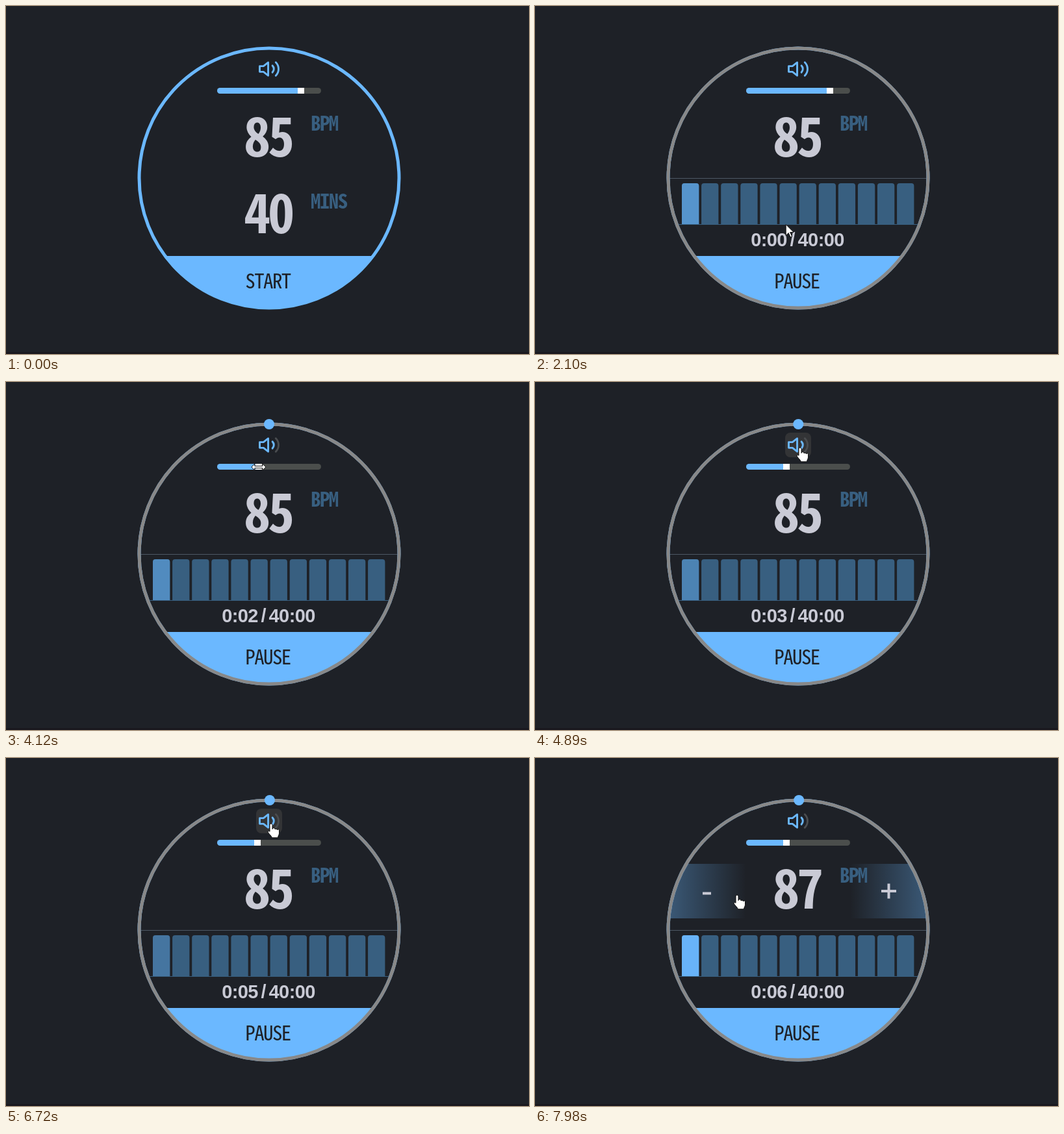
Recreate the animation shown at these times as an HTML page. Size 805 by 536 pixels, loop 8000 ms.

```html
<!DOCTYPE html>
<html lang="en">
<head>
<meta charset="utf-8">
<title>Metronome timer</title>
<style>
  html, body { margin: 0; width: 100%; height: 100%; overflow: hidden; background: #1e2127; }
  svg { display: block; width: 100%; height: 100%; }
  text {
    font-family: "Noto Sans Mono CJK JP", "Liberation Sans Narrow", "Liberation Sans", sans-serif;
    font-weight: 700; letter-spacing: -.05em; fill: #c9cad5;
  }
  .big { font-size: calc(var(--fit) * 88px); text-anchor: middle; }
  .label { font-size: calc(var(--fit) * 33px); fill: #385f80; }
  .action { font-size: calc(var(--fit) * 33px); font-weight: 500; text-anchor: middle; fill: #1e2127; }
  .time {
    font-family: "Liberation Sans Narrow", "Liberation Sans", sans-serif; font-size: 29px;
    letter-spacing: -.02em; word-spacing: -.1em; text-anchor: middle;
  }
  .line { fill: none; stroke: #6bb8ff; stroke-width: 2; stroke-linecap: round; stroke-linejoin: round; }
  .pointer { fill: #fff; stroke: #111; stroke-width: 1; stroke-linejoin: round; }
</style>
</head>
<body>
<svg viewBox="0 0 805 536">
  <defs>
    <clipPath id="face"><circle cx="405" cy="265" r="199"/></clipPath>
    <clipPath id="track"><rect x="325" y="126" width="160" height="9" rx="4.5"/></clipPath>
    <linearGradient id="fade">
      <stop stop-color="#6bb8ff" stop-opacity=".37"/>
      <stop offset="1" stop-color="#6bb8ff" stop-opacity="0"/>
    </linearGradient>
  </defs>
  <rect width="805" height="536" fill="#1e2127"/>
  <rect y="533" width="805" height="3" fill="#1a181e"/>

  <g clip-path="url(#face)">
    <g id="adjust">
      <rect x="206" y="163" width="119" height="84" fill="url(#fade)"/>
      <rect x="206" y="163" width="119" height="84" fill="url(#fade)" transform="matrix(-1 0 0 1 810 0)"/>
      <path d="M258 208.5h13M533 205h23M544.5 193.5v23" stroke="#c9cad5" stroke-width="4"/>
    </g>
    <g id="progress">
      <path d="M206 265.5H604" stroke="#4d5864"/>
      <path d="M206 336.5H604" stroke="#385f80"/>
      <g id="bars" fill="#385f80"></g>
    </g>
    <rect x="200" y="385" width="410" height="90" fill="#6bb8ff"/>
    <rect id="buttonHover" x="200" y="385" width="410" height="90" fill="#84c5ff"/>
  </g>
  <g fill="none" stroke-width="5">
    <circle cx="405" cy="265" r="200" stroke="#6bb8ff"/>
    <circle id="ring" cx="405" cy="265" r="200" stroke="#888"/>
  </g>
  <circle id="dot" cy="65" r="8" fill="#6bb8ff"/>

  <rect id="iconHover" x="385" y="78" width="40" height="38" rx="8" fill="#333436"/>
  <g class="line" transform="translate(387.6 79.6) scale(1.45)">
    <path d="M11 5 6 9H2v6h4l5 4z"/>
    <path d="M15.54 8.46a5 5 0 0 1 0 7.07"/>
    <path id="wave" d="M19.07 4.93a10 10 0 0 1 0 14.14"/>
  </g>
  <g clip-path="url(#track)">
    <rect x="325" y="126" width="160" height="9" fill="#4b4e4c"/>
    <rect id="fill" x="325" y="126" height="9" fill="#6bb8ff"/>
    <rect id="thumb" y="126" width="10" height="9" fill="#fff"/>
  </g>

  <text id="bpm" class="big" x="403" y="201.5" dy=".365em">85</text>
  <text class="label" x="469" y="181" dy=".365em">BPM</text>
  <g id="setup">
    <text class="big" x="403" y="319.5" dy=".365em">40</text>
    <text class="label" x="469" y="301" dy=".365em">MINS</text>
  </g>
  <text id="time" class="time" x="404" y="359.5" dy=".36em"></text>
  <text id="action" class="action" x="403" y="424" dy=".365em"></text>

  <g id="cursor" class="pointer">
    <path id="arrow" d="M0 0V17l4-4 3 6.5 2.5-1-3-6.5H12z"/>
    <path id="hand" d="M-2 2a2 2 0 0 1 4 0v6.5a2 2 0 0 1 4 .3a2 2 0 0 1 3.5 1a1.6 1.6 0 0 1 3 1v4c0 3-2 4-2 7H1.5c-1-3-4-5-6-8c-1-2 1-3 2.5-1.5z"/>
    <path id="resize" d="M-11 0l5-5v3.5H6V-5l5 5-5 5V1.5H-6V5z"/>
  </g>
</svg>
<script>
const LOOP = 8000, ENTER = 720, PRESS = 1400, FIRST_SECOND = 1590;
const $ = id => document.getElementById(id);
const show = (id, on) => $(id).setAttribute('visibility', on ? 'visible' : 'hidden');
const set = (id, attrs) => { for (const k in attrs) $(id).setAttribute(k, attrs[k]); };
const clamp = (v, lo, hi) => Math.min(hi, Math.max(lo, v));
const easeOut = k => 1 - (1 - k) ** 2;

// Size the type by how wide the installed face's digits are.
const bpm = $('bpm');
document.body.style.setProperty('--fit', 1);
const digitWidth = bpm.getComputedTextLength() / 2 / 88;
document.body.style.setProperty('--fit', Math.min(1, Math.sqrt(0.395 / digitWidth)));

// Round only the top corners of each bar.
const bar = (i, attrs = '') =>
  `<path ${attrs} d="M${226 + 30.1 * i} 336v-59q0-4 4-4h18.3q4 0 4 4v59z"/>`;
$('bars').innerHTML = Array.from({ length: 12 }, (_, i) => bar(i)).join('') +
  bar(0, 'id="current" fill="#6bb8ff"');

const below = [396, 545], button = [382, 441], tempo = [392, 190], loud = [451, 131],
  quiet = [387, 131], icon = [408, 101], plus = [534, 205], minus = [311, 211];
const trips = [
  { from: ENTER, to: 950, place: button },
  { from: 1950, to: 2590, place: tempo },
  { from: 2730, to: 3300, place: loud },
  { from: 3440, to: 4260, place: quiet },
  { from: 4540, to: 4890, place: icon },
  { from: 5240, to: 5700, place: tempo },
  { from: 5800, to: 6360, place: icon },
  { from: 6790, to: 7210, place: plus },
  { from: 7560, to: 7980, place: minus }
];

function pointerAt(t) {
  return trips.reduce((at, { from, to, place }) => {
    const k = easeOut(clamp((t - from) / (to - from), 0, 1));
    return at.map((v, i) => v + (place[i] - v) * k);
  }, below);
}

function draw(t) {
  const started = t >= PRESS, visible = t >= ENTER;
  const seconds = Math.max(0, Math.floor((t - FIRST_SECOND) / 1000));
  const [x, y] = pointerAt(t);
  const inside = Math.hypot(x - 405, y - 265) < 202;
  const within = (left, top, right, bottom) =>
    visible && inside && x >= left && x <= right && y >= top && y <= bottom;

  const overButton = within(200, 385, 610, 470);
  const overTempo = within(200, 163, 610, 247);
  const overIcon = within(385, 78, 425, 116);
  const overSlider = within(325, 124, 485, 137);

  show('buttonHover', overButton);
  show('adjust', overTempo);
  show('iconHover', overIcon);
  show('setup', !started);
  show('progress', started);
  show('time', started);
  set('ring', { opacity: clamp((t - PRESS) / 280, 0, 1) });
  set('current', { opacity: 0.6 + 0.35 * Math.sin(Math.PI / 20 * seconds * (seconds + 9)) });

  show('dot', seconds >= 2);
  set('dot', { cx: 405 + 0.3 * (seconds - 2) });

  // The thumb follows the pointer only while it is dragged.
  const thumb = t < 3440 ? 449 : pointerAt(Math.min(t, 4260))[0] - 5;
  set('thumb', { x: thumb });
  set('fill', { width: thumb - 325 });
  $('wave').style.stroke = thumb < 400 ? '#4a4d50' : '';

  bpm.textContent = 85 + (t >= 7280) + (t >= 7420);
  $('time').textContent = `0:0${seconds} / 40:00`;
  $('action').textContent = started ? 'PAUSE' : 'START';

  const hand = overButton || overIcon || overTempo && (x < 325 || x > 485);
  set('cursor', { transform: `translate(${x} ${y})` });
  show('hand', visible && hand);
  show('resize', visible && overSlider);
  show('arrow', visible && !hand && !overSlider);
}

const start = performance.now();
function frame() {
  draw((performance.now() - start) % LOOP);
  requestAnimationFrame(frame);
}
frame();
</script>
</body>
</html>
```
